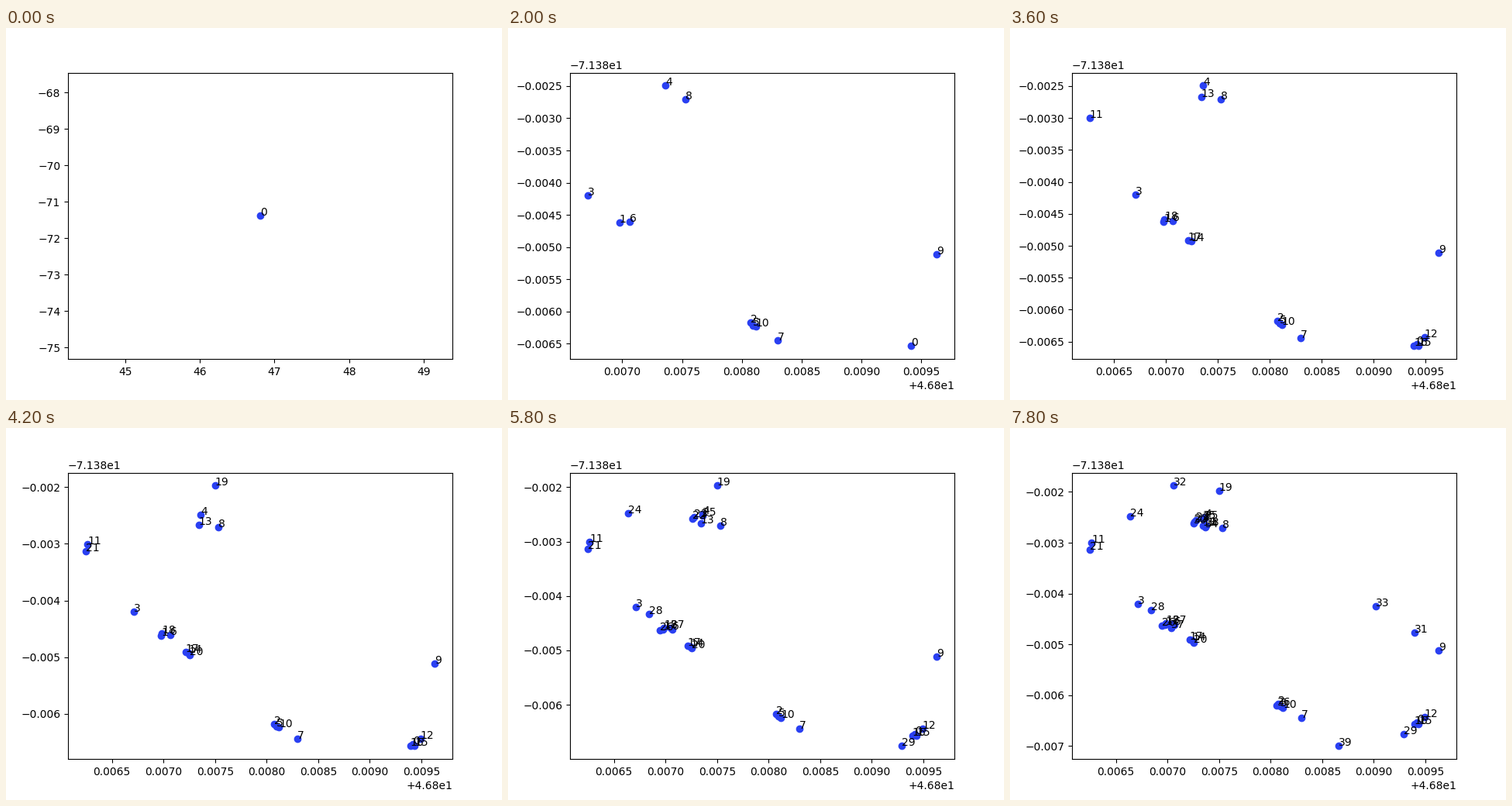
Animation of 640 by 480 pixels, one loop 8 s. Source, as a matplotlib script:

```python
import numpy as np
import matplotlib.pyplot as plt
from matplotlib.animation import FuncAnimation

STEP_MS = 200
BASE = np.array([46.8, -71.38])
UNIT = 1e-6
BLUE = "#2a40f2"

# Distinct places a, b, c, ... as offsets from BASE, and the order of visits.
PLACES = [
    (9416, -6540), (6977, -4620), (8076, -6175), (6709, -4199), (7359, -2493),
    (8094, -6216), (7064, -4611), (8299, -6447), (7531, -2703), (9632, -5112),
    (6262, -3001), (9492, -6435), (7341, -2667), (7242, -4926), (7501, -1973),
    (6243, -3130), (7260, -2580), (6635, -2478), (6838, -4332), (9290, -6759),
    (9395, -4768), (7056, -1877), (9020, -4248), (7034, -4676), (8659, -7000),
]
ROUTE = "abcdefghijfklmnaanbonpqqrebgstquvwmefxmy"
DRIFT = 34  # how far a repeat visit lands from the first
TURN = np.radians(-75)


def visits():
    """Coordinates of every visit; repeats land beside the first one."""
    points = []
    for i, stop in enumerate(ROUTE):
        offset = np.array(PLACES[ord(stop) - ord("a")], dtype=float)
        if stop in ROUTE[:i]:
            angle = TURN * (i + 0.2)
            offset += DRIFT * np.array([np.cos(angle), np.sin(angle)])
        points.append(BASE + offset * UNIT)
    return np.array(points)


points = visits()
fig, ax = plt.subplots(figsize=(6.4, 4.8), dpi=100)


def draw(frame):
    """Show all points up to this step, with axes refitted to them."""
    ax.clear()
    shown = points[:frame + 1]
    ax.scatter(shown[:, 0], shown[:, 1], color=BLUE)
    for i, (x, y) in enumerate(shown):
        ax.annotate(str(i), (x, y))


anim = FuncAnimation(fig, draw, frames=len(points), init_func=lambda: draw(0),
                     interval=STEP_MS, repeat=True, repeat_delay=0)
plt.show()
```
